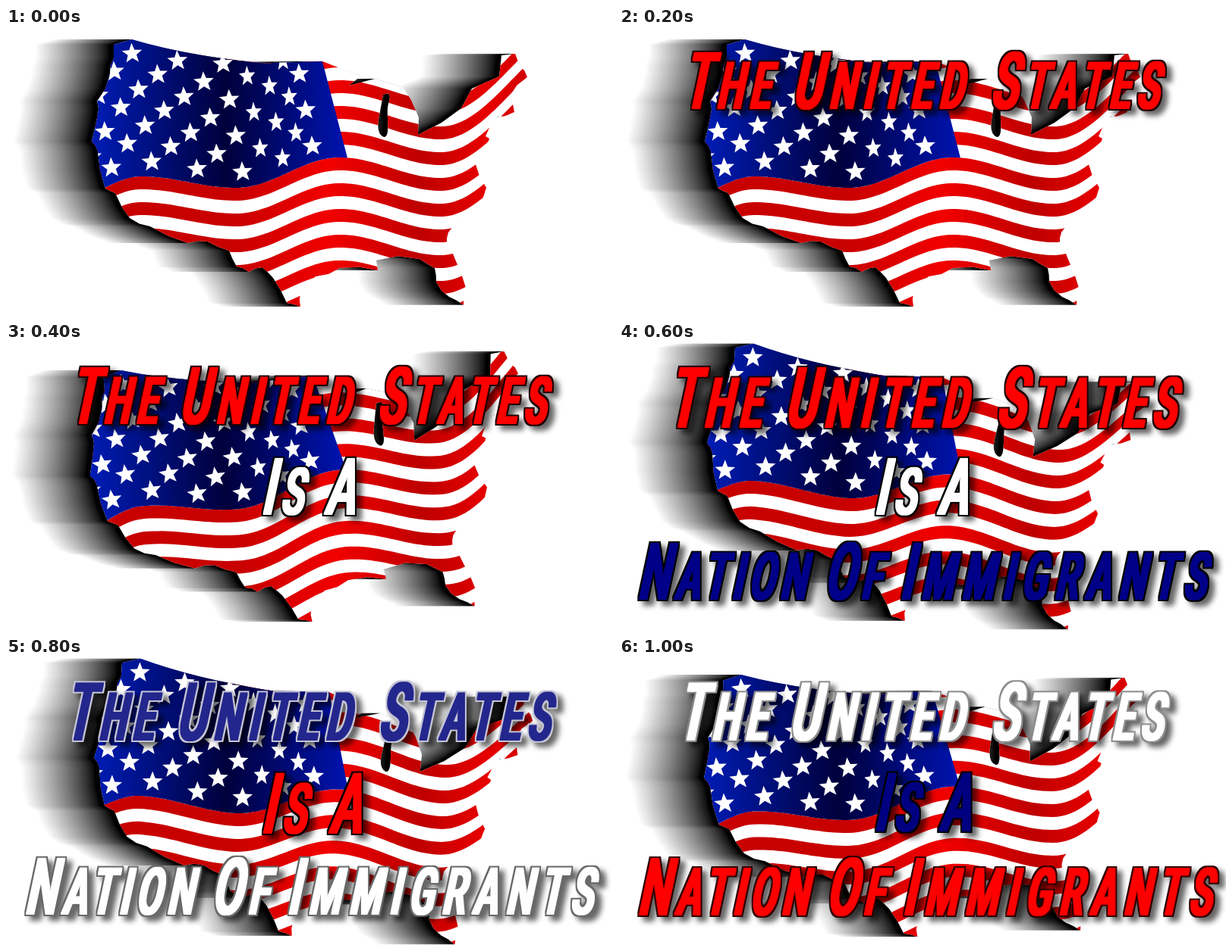
An HTML page for the animation above (1.2 s loop, 800 px wide and 379 px high).

```html
<!DOCTYPE html>
<html lang="en">
<head>
<meta charset="utf-8">
<title>The United States Is A Nation Of Immigrants</title>
<style>
  html, body { margin: 0; width: 100%; height: 100%; overflow: hidden; background: #fff; }
  svg { display: block; width: 100vw; height: 100vh; }
  text { font-family: Roboto, "Liberation Sans", sans-serif; font-weight: 500; }
</style>
</head>
<body>
<svg id="stage" viewBox="0 0 800 379">
  <defs id="defs">
    <path id="land" fill-rule="evenodd"/>
    <clipPath id="border"><path id="edge" clip-rule="evenodd"/></clipPath>
    <linearGradient id="red" gradientUnits="userSpaceOnUse" x1="115" y1="0" x2="690" y2="0">
      <stop offset="0" stop-color="#c80000"/><stop offset=".32" stop-color="#c80000"/>
      <stop offset=".54" stop-color="#f20000"/><stop offset=".75" stop-color="#be0000"/>
      <stop offset=".9" stop-color="#e80000"/><stop offset="1" stop-color="#d00000"/>
    </linearGradient>
    <linearGradient id="blue" gradientUnits="userSpaceOnUse" x1="115" y1="0" x2="450" y2="0">
      <stop offset="0" stop-color="#001cb4"/><stop offset=".52" stop-color="#00003c"/>
      <stop offset="1" stop-color="#0014b0"/>
    </linearGradient>
  </defs>
  <rect width="800" height="379" fill="#fff"/>
  <g id="trail"></g>
  <g id="flag"><g id="cloth" clip-path="url(#border)"></g></g>
  <g id="words"></g>
</svg>
<script>
const $ = id => document.getElementById(id);

function add(parent, tag, attrs = {}) {
  const el = document.createElementNS('http://www.w3.org/2000/svg', tag);
  for (const key in attrs) el.setAttribute(key, attrs[key]);
  return parent.appendChild(el);
}

let seed = 7;
function random() {
  seed = (seed * 16807) % 2147483647;
  return seed / 2147483647;
}

// Key points of the country, clockwise; coasts get a seeded raggedness
const north = 'M142 22L162 16 166 15Q220 31 285 40T350 46L417 44 440 53 468 63 452 76 486 67 ' +
  '523 78 534 95 544 118 543 141 574 125 600 106 614 80 650 64 653 36 671 34';
const east = '677 50 687 65 664 90 670 111 646 118 632 143 637 146 630 163 618 177 633 211 ' +
  '628 227 604 245 583 270 581 285 593 308 606 343 603 366 584 355 567 335 565 317 545 305 488 307';
const southWest = '490 320 440 317 408 328 389 348 388 368 370 363 352 330 338 316 320 322 304 315 ' +
  '294 294 266 282 240 284 190 262 163 251 144 218 131 212 121 163 113 150 122 108 120 97 137 60 142 40';
const lake = 'M497 88Q510 82 504 100C500 112 508 144 498 144Q488 140 491 121Z';

function ragged(coast) {
  const n = coast.split(' ').map(Number);
  let d = `L${n[0]} ${n[1]}`;
  for (let i = 2; i < n.length; i += 2) {
    const dx = n[i] - n[i - 2], dy = n[i + 1] - n[i - 1];
    const bend = (random() - 0.5) * 0.2;
    d += `L${n[i - 2] + dx / 2 - dy * bend} ${n[i - 1] + dy / 2 + dx * bend}L${n[i]} ${n[i + 1]}`;
  }
  return d;
}

const outline = north + ragged(east) + ragged(southWest) + 'Z' + lake;
$('land').setAttribute('d', outline);
$('edge').setAttribute('d', outline);

// Smeared shadow: grey copies, farthest first
const reach = 104;
for (let k = reach; k > 0; k--) {
  const v = Math.round(255 * Math.pow(Math.max(0, k - 6) / (reach - 6), 0.8));
  add($('trail'), 'use', { href: '#land', x: -k, fill: `rgb(${v},${v},${v})` });
}

// Height of the cloth's wave: cosine easing between crests and troughs
const turns = [[90, 222], [178, 196], [303, 211], [440, 171], [573, 198], [760, 75]];
function wave(x) {
  const i = Math.max(1, turns.findIndex(p => p[0] >= x));
  const [x0, y0] = turns[i - 1], [x1, y1] = turns[i];
  return y0 + (y1 - y0) * (1 - Math.cos(Math.PI * (x - x0) / (x1 - x0))) / 2;
}

function curve(from, to, dy) {
  const pts = [], steps = 100;
  for (let i = 0; i <= steps; i++) {
    const x = from + (to - from) * i / steps;
    pts.push(`${x.toFixed(1)} ${(wave(x) + dy).toFixed(1)}`);
  }
  return pts.join(' ');
}

const stripe = 17, left = 95, right = 720;
const cloth = $('cloth');
add(cloth, 'rect', { x: left, width: right - left, height: 379, fill: '#fff' });
for (let n = -10; n <= 10; n += 2) {
  add(cloth, 'path', {
    d: `M${curve(left, right, n * stripe)}L${curve(right, left, (n + 1) * stripe)}Z`,
    fill: 'url(#red)'
  });
}
add(cloth, 'path', { d: `M95 0L405.6 0L${curve(450, left, 0)}Z`, fill: 'url(#blue)' });

// Staggered star grid that rides the wave and narrows towards the right
function star(cx, cy, narrow) {
  let d = 'M';
  for (let i = 0; i < 10; i++) {
    const r = i % 2 ? 6 : 14, a = i * Math.PI / 5 - 0.06;
    d += `${cx + narrow * r * Math.sin(a)} ${cy - r * Math.cos(a)} `;
  }
  add(cloth, 'path', { d: d + 'Z', fill: '#fff' });
}
for (let row = 0; row < 7; row++) {
  for (let col = -3; col <= 8; col++) {
    if ((row + col) % 2) continue;
    const c = col - 2, x = 226 + 30.5 * c - 0.144 * c ** 3;
    star(x + 4.3 * row, wave(x + 30) - 163 + 23.8 * row, col > 4 && col < 8 ? 0.8 : 1);
  }
}

// Lettering: slanted, condensed capitals with an outline and a soft shadow
const condense = 0.56;

function makeLine(id, x0, top, words) {
  const filter = add($('defs'), 'filter', {
    id, filterUnits: 'userSpaceOnUse', x: -30, y: -10, width: 880, height: 420,
    'color-interpolation-filters': 'sRGB'
  });
  add(filter, 'feMorphology', { in: 'SourceGraphic', operator: 'dilate', radius: '2 1', result: 'body' });
  add(filter, 'feMorphology', { in: 'body', operator: 'dilate', radius: 2, result: 'wide' });
  const flood = add(filter, 'feFlood');
  add(filter, 'feComposite', { in2: 'wide', operator: 'in', result: 'rim' });
  add(filter, 'feFlood', { 'flood-color': '#000', 'flood-opacity': 0.6 });
  add(filter, 'feComposite', { in2: 'wide', operator: 'in' });
  add(filter, 'feOffset', { dx: 7, dy: 6 });
  add(filter, 'feGaussianBlur', { stdDeviation: 3.5, result: 'shade' });
  const merge = add(filter, 'feMerge');
  for (const layer of ['shade', 'rim', 'body']) add(merge, 'feMergeNode', { in: layer });

  const group = add($('words'), 'g', { filter: `url(#${id})` });
  for (const [word, x, gap] of words) {
    const text = add(group, 'text', {
      transform: `translate(${x} ${top + 76}) skewX(-12) scale(${condense} 1)`,
      'letter-spacing': gap / condense
    });
    add(text, 'tspan', { 'font-size': 103 }).textContent = word[0];
    add(text, 'tspan', { 'font-size': 85 }).textContent = word.slice(1);
  }
  return look => {
    group.style.display = look ? '' : 'none';
    if (!look) return;
    const [fill, rim, size, dx] = look;
    group.setAttribute('fill', fill);
    flood.setAttribute('flood-color', rim);
    group.setAttribute('transform',
      `translate(${x0 + dx - size * x0} ${top - size * top}) scale(${size})`);
  };
}

const lines = [
  makeLine('country', 95, 30, [['THE', 84, 9], ['UNITED', 228, 10.6], ['STATES', 489, 9.3]]),
  makeLine('verb', 336, 150, [['IS', 336, 9], ['A', 420, 9]]),
  makeLine('people', 22, 262, [['NATION', 24, 8.5], ['OF', 270, 8.5], ['IMMIGRANTS', 370, 11.6]])
];

// Each pose: map angle, then [fill, rim, size, shift] for every line
const redTitle = ['#f00', '#200000', 1, 0];
const whiteVerb = ['#fff', '#000', 1, 0];
const poses = [
  [0],
  [0, redTitle],
  [-5, redTitle, whiteVerb],
  [3.6, ['#f00', '#200000', 1.067, -19], whiteVerb, ['#000088', '#000', 1, 0]],
  [3.6, ['#23268c', '#c4c4d4', 1.02, -7], ['#f00', '#000', 1.07, 0], ['#fff', '#686868', 1, 0]],
  [-1.7, ['#fff', '#8c8c8c', 1.02, -7], ['#000080', '#000', 1.03, 0], ['#f00', '#300000', 1.01, 0]]
];
const hold = 200;

let shown = -1;
function render(time) {
  const index = Math.floor(time / hold) % poses.length;
  if (index === shown) return;
  shown = index;
  const [angle, ...looks] = poses[index];
  const turn = `rotate(${angle} 400 189)`;
  $('land').setAttribute('transform', turn);
  $('flag').setAttribute('transform', turn);
  lines.forEach((show, i) => show(looks[i]));
}

const start = performance.now();
function tick() {
  render(performance.now() - start);
  requestAnimationFrame(tick);
}
tick();
</script>
</body>
</html>
```
